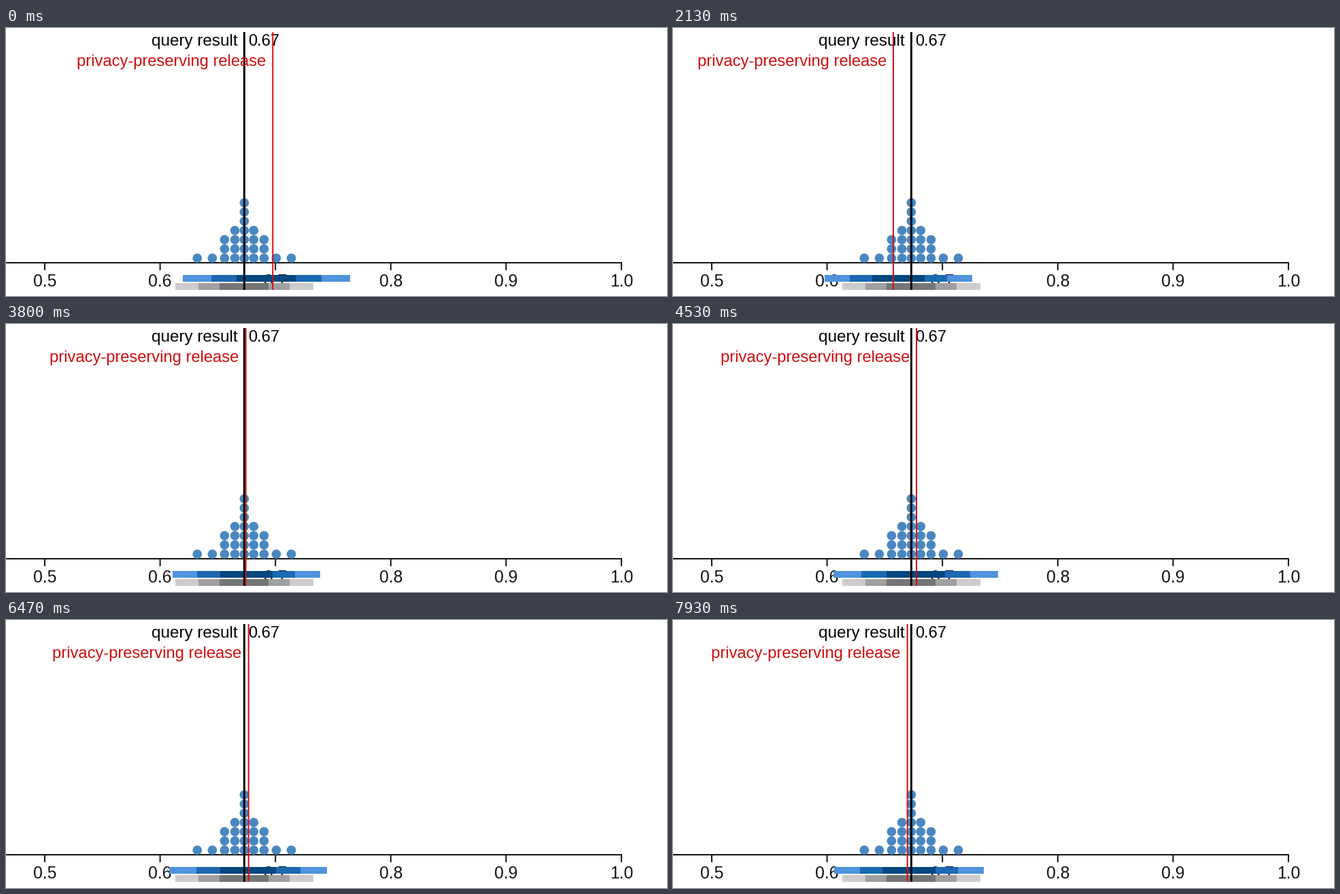
These frames come from a looping animation (972 by 395 pixels, 8000 ms). A matplotlib script:

```python
import math

import matplotlib.pyplot as plt
from matplotlib.animation import FuncAnimation
from matplotlib.patches import Circle, Rectangle

W, H, DPI = 972, 395, 100
PX = 72 / DPI
LOOP, STEP = 8000, 20
HOLD, FIRST = 400, 870  # ms per release, time of the first change

INK, RED, DOT = "#141414", "#d20f0f", "#4a87c0"
BLUES = ["#4f93dd", "#1c69b3", "#03477f"]
GREYS = ["#cccccc", "#a0a0a0", "#767676"]
NESTING = (1, 0.66, 0.355)

QUERY = 0.673
RELEASES = [0.6977, 0.6315, 0.6702, 0.6645, 0.6574, 0.7211, 0.6540,
            0.6333, 0.6743, 0.6952, 0.6775, 0.6848, 0.6881, 0.6722,
            0.6798, 0.6767, 0.6616, 0.6710, 0.6696]

fig = plt.figure(figsize=(W / DPI, H / DPI), dpi=DPI, facecolor="white")
ax = fig.add_axes([0, 0, 1, 1])
ax.set_xlim(0, W)
ax.set_ylim(H, 0)
ax.axis("off")


def to_x(value):
    return 57 + 1696 * (value - 0.5)


def line(x0, y0, x1, y1, color, width, z):
    return ax.plot([x0, x1], [y0, y1], color=color, lw=width * PX, snap=False,
                   solid_capstyle="butt", zorder=z)[0]


def label(x, y, text, size, ha, color="black", z=6):
    return ax.text(x, y, text, fontsize=size * PX, ha=ha, va="baseline",
                   color=color, family="Liberation Sans", zorder=z)


def band(y, colors):
    """Three nested bars, outermost first."""
    bars = [Rectangle((0, y), 1, 10, color=c, lw=0, zorder=3) for c in colors]
    for bar in bars:
        ax.add_patch(bar)
    return bars


def set_band(bars, mid, half):
    for bar, part in zip(bars, NESTING):
        bar.set_x(mid - half * part)
        bar.set_width(2 * half * part)


query_x = to_x(QUERY)

# axis
line(0, 346, 906, 346, INK, 2, 1)
for i in range(6):
    value = 0.5 + i / 10
    x = to_x(value)
    line(x, 346, x, 357, INK, 2, 1)
    label(x, 381, f"{value:.1f}", 24.7, "center", INK, 1)

# dot plot: columns spread out towards the tails
for j in range(-4, 5):
    x = query_x + 13.6 * j + 0.23 * j**3
    for k in range((7, 4, 3, 1, 1)[abs(j)]):
        ax.add_patch(Circle((x, 339.2 - 13.6 * k), 6.8, color=DOT, lw=0, zorder=2))

# intervals
blue = band(364, BLUES)
set_band(band(376, GREYS), query_x, 101.5)

# query result and noisy release
line(query_x, 6, query_x, 386, "black", 3, 4)
label(341, 26.3, "query result", 24.2, "right")
label(356.2, 26.3, f"{QUERY:.2f}", 23.6, "left")
release = line(0, 6, 0, 386, RED, 2, 7)
caption = label(0, 56.3, "privacy-preserving release", 23.7, "right", RED, 8)


def update(i):
    now = i * STEP + STEP // 2
    k = max(0, (now - FIRST) // HOLD + 1)
    x = to_x(RELEASES[k])
    release.set_xdata([x, x])
    caption.set_x(x - 10)
    # the interval leans back towards the query result, its width wavers
    mid = query_x + 0.75 * (x - query_x) + 1
    set_band(blue, mid, 118 + 12 * math.cos(1.9 * (k - 6)))
    return [release, caption, *blue]


anim = FuncAnimation(fig, update, frames=LOOP // STEP, interval=STEP,
                     repeat=True, repeat_delay=0, blit=False)
plt.show()
```
